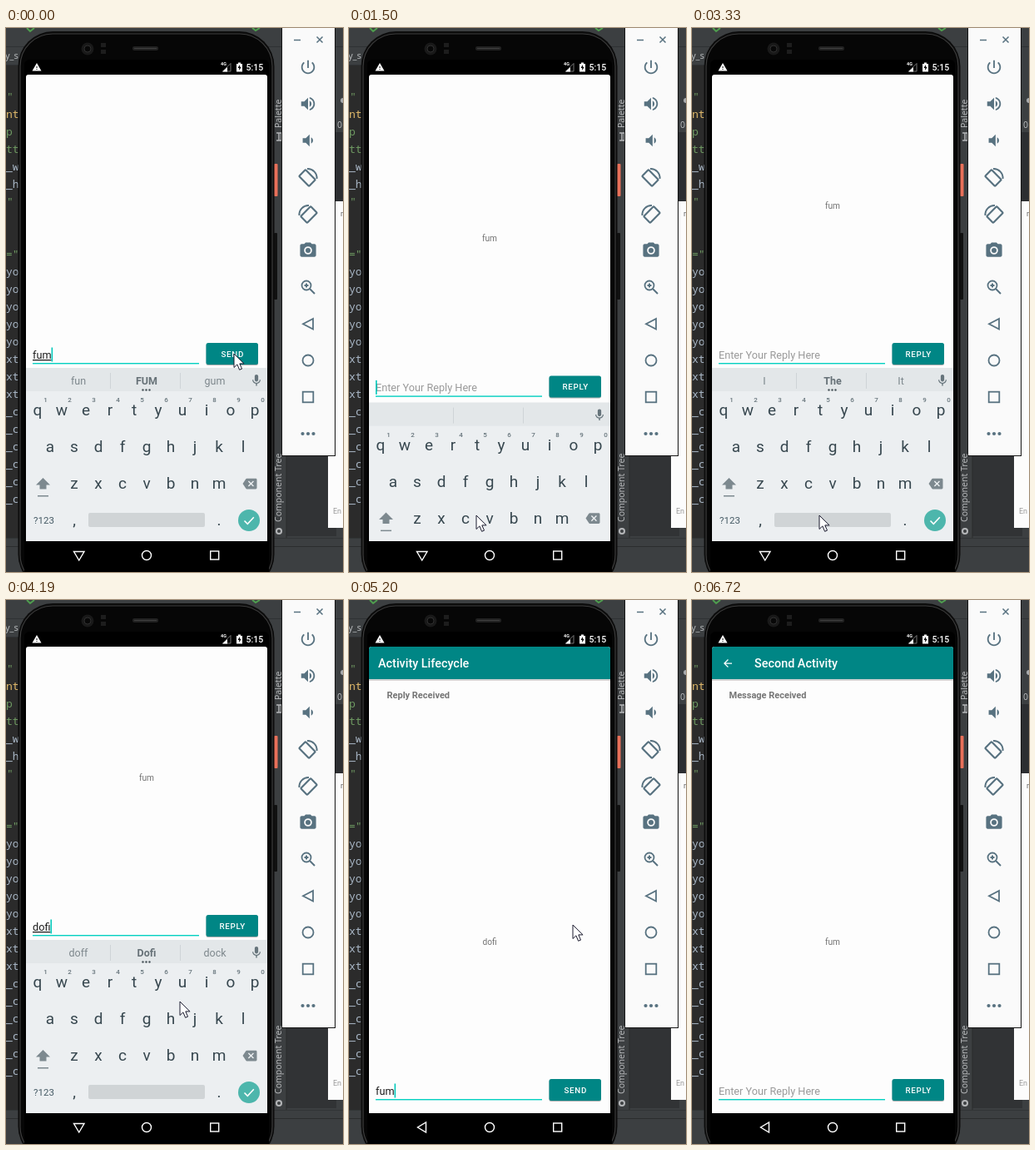
An HTML page that plays this animation: 405x653 px, repeating every 7.15 s.

```html
<!DOCTYPE html>
<html lang="en">
<head>
<meta charset="utf-8">
<title>Two activities exchanging messages</title>
<style>
html, body { margin: 0; height: 100%; overflow: hidden; background: #3c3f41; }
svg { display: block; width: 100vw; height: 100vh; font-family: Roboto, sans-serif; }
.mid { text-anchor: middle; }
.code { font: 13px "Noto Sans Mono", monospace; }
.tab { font: 11px "Noto Sans", sans-serif; fill: #b5b8ba; }
.title { font-size: 14.4px; font-weight: 500; fill: #fff; }
.label { font-size: 11px; font-weight: 700; fill: #757575; }
.msg { font-size: 10.2px; fill: #757575; text-anchor: middle; }
.input { font-size: 12.7px; }
.btn { font-size: 9.8px; font-weight: 500; letter-spacing: .7px; fill: #fff; text-anchor: middle; }
.key { font-size: 19px; fill: #37474f; text-anchor: middle; }
.num { font-size: 8px; font-weight: 500; fill: #66747b; text-anchor: middle; }
.word { font-size: 12.5px; fill: #7d878c; text-anchor: middle; }
.side { font: 10.5px "Noto Sans", sans-serif; fill: #b4b6b8; }
</style>
</head>
<body>
<svg id="stage" viewBox="0 0 405 653" preserveAspectRatio="none"></svg>
<script>
const LOOP = 7150, PAN = 197, TEAL = '#008685', PRESSED = '#38a2a1';
const SENT = 'fum', REPLY = 'dofi';

const rect = (x, y, w, h, fill, more = '') =>
  `<rect x="${x}" y="${y}" width="${w}" height="${h}" fill="${fill}" ${more}/>`;
const text = (x, y, s, cls, more = '') => `<text x="${x}" y="${y}" class="${cls}" ${more}>${s}</text>`;
const line = (d, stroke, width = 1.5, more = '') =>
  `<path d="${d}" fill="none" stroke="${stroke}" stroke-width="${width}" ${more}/>`;
const dot = (x, y, r, fill, more = '') => `<circle cx="${x}" cy="${y}" r="${r}" fill="${fill}" ${more}/>`;
// A 24-unit icon centred on x, y
const icon = (x, y, size, d, fill) =>
  `<path transform="translate(${x - size / 2} ${y - size / 2}) scale(${size / 24})" d="${d}" fill="${fill}" fill-rule="evenodd"/>`;

function backdrop() {
  const rows = '"|nt|p|tt|_w|_h|"|||="|yo|yo|yo|yo|yo|xt|xt|xt|_c|_c|_c|_c|_c|_c'.split('|');
  const tint = s => s.includes('"') || s === 'p' || s === 'tt' ? '#6f9a62' : s === 'nt' ? '#e0b96a' : '#a9b7c6';
  return rect(0, 0, 405, 653, '#3c3f41') + rect(0, 44, 30, 568, '#2b2b2b') +
    line('M0 22.5H405M0 44.5H30', '#2f3234', 1) + text(-1, 37, 'y_s', 'tab') +
    rows.map((s, i) => text(s === '"' ? 1 : 0, 87 + 21 * i, s, 'code', `fill="${tint(s)}"`)).join('') +
    line('M25 0l4 4 5-4M296 0l4 3 5-3', '#4f9e4f', 2) +
    rect(337, 513, 60, 97, '#313335') + line('M337 513V612', '#2a2c2d', 1) +
    text(0, 0, 'Palette', 'side', 'transform="translate(331 120) rotate(-90)"') +
    text(0, 0, 'Component Tree', 'side', 'transform="translate(331 593) rotate(-90)"') +
    line('M325 126h6v9h-6M328 126v9', '#b4b6b8', 1.5) + dot(328, 604, 3, 'none', 'stroke="#b4b6b8" stroke-width="2"') +
    rect(396, 125, 9, 83, '#2c2e31') + text(398, 120, '0', 'side') +
    dot(405, 87, 3, '#a9abad') + rect(387, 208, 18, 392, '#fcfcfc') +
    text(393, 583, 'En', '', 'font-size="9" fill="#999"') + text(402, 226, 'r', '', 'font-size="9" fill="#666"') +
    line('M0 622.5H405', '#2b2d2e', 1) + line('M0 612.5H405', '#323536', 1);
}

function phone() {
  return rect(322, 163, 4.5, 39, '#e8705a', 'rx="1"') + rect(322, 246, 4, 80, '#111', 'rx="1"') +
    rect(14.5, 4, 308, 670, '#0c0c0c', 'rx="42"') +
    rect(17, 7, 303, 664, '#060606', 'rx="39" stroke="#3c3c3c" stroke-width="1.2"') +
    rect(22, 38, 294, 620, '#000', 'rx="6"') +
    dot(98, 25, 7.5, '#191919') + dot(98, 25, 4, '#080808', 'stroke="#303030"') +
    rect(114, 18, 6, 5, '#1d1d1d') + rect(114, 26, 6, 5, '#1d1d1d') +
    rect(152, 22, 31, 5, '#222', 'rx="2"') + line('M154 24.5H181', '#404040', 1);
}

function statusBar() {
  return icon(37, 47, 12, 'M1 21h22L12 2zm12-3h-2v-2h2zm0-4h-2v-4h2z', '#fff') +
    text(258, 45, '4G', '', 'font-size="5.5" font-weight="700" fill="#fff"') +
    line('M270 42.5V52h-9.5z', '#777', 1) + `<path d="M266 47v5.5h-6z" fill="#fff"/>` +
    `<path d="M277 43h2v-1.500h3v1.500h2v9.500h-7z" fill="#fff"/><path d="M281 44l-2.500 4h1.700v3l2.500-4.200h-1.700z" fill="#000"/>` +
    text(288.5, 51, '5:15', '', 'font-size="10.5" font-weight="500" fill="#fff"');
}

function activity(id, title, titleX, label, labelX, message, button, arrow) {
  return `<g id="${id}">` + rect(24, 38, 290, 615, '#000') +
    `<g clip-path="url(#content)">` + rect(24, 56, 290, 560, '#fdfdfd') + `<g id="${id}Pan">` +
    rect(24, 95, 290, 2, '#000', 'opacity=".16"') + rect(24, 56, 290, 39, TEAL) +
    (arrow ? icon(43, 76, 15, 'M20 11H7.830l5.590-5.590L12 4l-8 8 8 8 1.410-1.410L7.830 13H20z', '#fff') : '') +
    text(titleX, 81, title, 'title') +
    `<g id="${id}Body">` + text(labelX, 118, label, 'label') + text(169, 414, message, 'msg') + '</g>' +
    rect(32, 599, 200, 1.4, '#03d0c1', `id="${id}Line"`) + text(32, 594, '', 'input', `id="${id}Text"`) +
    rect(0, 580.5, 1.6, 17, '#03c9bb', `id="${id}Caret"`) +
    rect(240.5, 575, 62.5, 26, TEAL, `rx="2.5" id="${id}Btn"`) + text(272.2, 592, button, 'btn') +
    '</g></g></g>';
}

function keyboard() {
  const row = (letters, x, y) => [...letters].map((c, i) => text(x + 29 * i, y, c, 'key')).join('');
  return `<g clip-path="url(#content)"><g id="kb">` + rect(24, 408, 290, 208, '#eceff1') + rect(24, 408, 290, 28, '#e3e7e9') +
    line('M125.500 414V433M209.500 414V433', '#cfd4d7', 1) +
    [87, 169, 251].map((x, i) => text(x, 428, '', 'word', `id="word${i}"` + (i === 1 ? ' style="font-weight:700;fill:#667177"' : ''))).join('') +
    `<g id="dots">` + [164.5, 168.5, 172.5].map(x => dot(x, 434.5, 1.2, '#4a555b')).join('') + '</g>' +
    icon(301, 423, 17, 'M12 14c1.660 0 3-1.340 3-3V5c0-1.660-1.340-3-3-3S9 3.340 9 5v6c0 1.660 1.340 3 3 3zm5.300-3c0 3-2.540 5.100-5.300 5.100S6.700 14 6.700 11H5c0 3.410 2.720 6.230 6 6.720V21h2v-3.280c3.280-.480 6-3.300 6-6.720z', '#66747b') +
    [...'1234567890'].map((c, i) => text(47.5 + 29 * i, 449, c, 'num')).join('') +
    row('qwertyuiop', 38, 465) + row('asdfghjkl', 53, 509) + row('zxcvbnm', 82, 553) +
    `<path d="M44.500 540l8.500 8.500h-4.500v5h-8v-5h-4.500z" fill="#7d898f"/>` + rect(38, 561, 13, 1.5, '#7d898f') +
    icon(293, 547, 17, 'M22 3H7c-.690 0-1.230.350-1.590.880L0 12l5.410 8.110c.360.530.900.890 1.590.890h15c1.100 0 2-.900 2-2V5c0-1.100-.900-2-2-2zm-3 12.590L17.590 17 14 13.410 10.410 17 9 15.590 12.590 12 9 8.410 10.410 7 14 10.590 17.590 7 19 8.410 15.410 12z', '#7d898f') +
    text(45.5, 595, '?123', 'mid', 'font-size="11.5" fill="#455a64"') + text(82, 597, ',', 'key') + text(256, 597, '.', 'key') +
    rect(99, 582, 140, 17, '#d0d4d6', 'rx="2"') + dot(292, 591, 13, '#4db6ac') +
    line('M286.500 591.500l3.800 3.800 7.500-8', '#fff', 1.6) + '</g></g>';
}

function toolPanel() {
  const c = '#587280', x = 363;
  const turn = (y, flip) => `<g transform="translate(${x} ${y}) scale(${flip} 1)">` +
    rect(-5.5, -8.5, 11, 17, 'none', `rx="1" transform="translate(-1 1) rotate(-45)" stroke="${c}" stroke-width="2.2"`) +
    line('M-1 -10A11 11 0 0 1 10.500 2', c, 2) + '</g>';
  return rect(331.5, -1, 64, 514.5, '#fafafa', 'stroke="#151515"') +
    line('M346 14.500h8M373.500 10.500l7 7M380.500 10.500l-7 7', c, 1.5) +
    icon(x, 47, 22, 'M13 3h-2v10h2zm4.830 2.170l-1.420 1.420C17.990 7.860 19 9.810 19 12c0 3.870-3.130 7-7 7s-7-3.130-7-7c0-2.190 1.010-4.140 2.580-5.420L6.170 5.170C4.230 6.820 3 9.260 3 12c0 4.970 4.030 9 9 9s9-4.030 9-9c0-2.740-1.230-5.180-3.170-6.830z', c) +
    icon(x, 91, 22, 'M3 9v6h4l5 5V4L7 9zm13.500 3c0-1.770-1.020-3.290-2.500-4.030v8.050c1.480-.730 2.500-2.250 2.500-4.020zM14 3.230v2.060c2.890.860 5 3.540 5 6.710s-2.110 5.850-5 6.710v2.060c4.010-.910 7-4.490 7-8.770s-2.990-7.860-7-8.770z', c) +
    icon(x, 135, 22, 'M18.500 12c0-1.770-1.020-3.290-2.500-4.030v8.050c1.480-.730 2.500-2.250 2.500-4.020zM5 9v6h4l5 5V4L9 9z', c) +
    turn(179, 1) + turn(223, -1) +
    icon(x, 267, 23, 'M9 2L7.170 4H4c-1.100 0-2 .900-2 2v12c0 1.100.900 2 2 2h16c1.100 0 2-.900 2-2V6c0-1.100-.900-2-2-2h-3.170L15 2zm3 15a5 5 0 1 1 0-10 5 5 0 0 1 0 10z', c) + dot(x, 267, 3, c) +
    dot(361, 309, 5.5, 'none', `stroke="${c}" stroke-width="1.8"`) + line('M365 313l6 6M358.500 309h5M361 306.500v5', c, 2) +
    line('M369 349v12.500l-12-6.250z', c, 1.8) + dot(x, 399, 6.5, 'none', `stroke="${c}" stroke-width="1.8"`) +
    rect(356.7, 436.7, 12.6, 12.6, 'none', `stroke="${c}" stroke-width="1.8"`) +
    [356.5, 363, 369.5].map(px => dot(px, 487, 2.1, c)).join('');
}

document.getElementById('stage').innerHTML =
  `<clipPath id="content"><path d="M24 616V59q0-3 3-3h284q3 0 3 3v557z"/></clipPath>` +
  `<clipPath id="screen"><rect x="24" y="56" width="290" height="597"/></clipPath>` +
  backdrop() + phone() + `<g clip-path="url(#screen)">` +
  activity('main', 'Activity Lifecycle', 35, 'Reply Received', 45.5, REPLY, 'SEND', false) +
  activity('second', 'Second Activity', 75, 'Message Received', 44.5, SENT, 'REPLY', true) +
  keyboard() + '</g>' + statusBar() +
  `<path id="back" fill="none" stroke="#fff" stroke-width="1.4"/>` + dot(169, 633, 5.5, 'none', 'stroke="#fff" stroke-width="1.4"') +
  rect(245.7, 628, 10, 10, 'none', 'stroke="#fff" stroke-width="1.4"') + toolPanel() +
  `<path id="pointer" d="M0 0v16.500l3.900-3.600 2.700 6.400 2.900-1.200-2.700-6.200h5.300z" fill="#fff" stroke="#1a1a2e"/>`;

const $ = id => document.getElementById(id);
const set = (id, attrs) => { for (const k in attrs) $(id).setAttribute(k, attrs[k]); };

// Each entry changes only the named parts of the state from its time on
const steps = [
  [0, { at: [274, 391], kb: 1, down: 1, mainPan: 1, secondPan: 0, alpha: 0, shift: 0, reply: 0, typed: '', mark: 1,
        caret: 1, words: ['fun', 'FUM', 'gum'], mainFill: TEAL, secondFill: TEAL, lift: 2 }],
  [120, { at: [273, 391], mainFill: PRESSED }],
  [270, { at: [240, 404], down: 0, alpha: .5, shift: 20, mark: 0 }],
  [390, { at: [185, 424], alpha: 1, shift: 3, kb: .4 }],
  [540, { at: [143, 434], shift: 0, kb: 0, mainPan: 0, mainFill: TEAL }],
  [690, { at: [147, 440] }],
  [810, { at: [151, 500] }],
  [930, { at: [152, 553], caret: 0 }],
  [1080, { at: [153, 584] }],
  [1230, { at: [153, 585], caret: 1 }],
  [1380, { kb: .35, secondPan: .35, down: 1, words: ['', '', ''] }],
  [1500, { kb: .8, secondPan: .8 }],
  [1620, { kb: 1, secondPan: 1 }],
  [1900, { caret: 0 }],
  [2030, { typed: 's', caret: 1 }],
  [2180, { mark: 1, words: ['is', 'a', 'as'] }],
  [2610, { caret: 0 }],
  [2750, { typed: '', caret: 1 }],
  [3030, { words: ['I', 'The', 'It'] }],
  [3330, { caret: 0 }],
  [3480, { typed: REPLY.slice(0, 2), caret: 1 }],
  [3610, { typed: REPLY.slice(0, 3) }],
  [3750, { typed: REPLY, words: ['doff', 'Dofi', 'dock'] }],
  [4190, { at: [209, 482] }],
  [4310, { at: [233, 443] }],
  [4430, { at: [257, 404], caret: 0 }],
  [4550, { at: [272, 388] }],
  [4830, { at: [269, 389], caret: 1, mark: 0, secondFill: PRESSED, down: 0, reply: 1 }],
  [5080, { alpha: .4, kb: .4 }],
  [5200, { at: [269, 390], alpha: 0, kb: 0, secondPan: 0, typed: '', secondFill: TEAL }],
  [5350, { at: [268, 393], caret: 0 }],
  [5500, { at: [279, 455] }],
  [5620, { at: [291, 545] }],
  [5740, { at: [296, 591], caret: 1 }],
  [6030, { at: [296, 592], mainFill: '#0b8c89', lift: 7 }],
  [6150, { alpha: .6, shift: 34 }],
  [6300, { alpha: 1, shift: 5 }],
  [6420, { shift: 0 }],
  [6570, { at: [330, 640] }],
  [6720, { at: [-50, 0], caret: 0 }]
];

function drawActivity(id, pan, typed, mark, fill, caret, lift) {
  const box = $(id + 'Text');
  set(id + 'Pan', { transform: `translate(0 ${-PAN * pan})` });
  box.textContent = typed || 'Enter Your Reply Here';
  box.setAttribute('fill', typed ? '#1c1c1c' : '#9a9a9a');
  box.style.textDecoration = typed && mark ? 'underline' : 'none';
  set(id + 'Caret', { x: 32 + (typed ? box.getComputedTextLength() : 0), opacity: caret });
  const button = $(id + 'Btn');
  button.setAttribute('fill', fill);
  button.style.filter = `drop-shadow(0 ${lift / 2}px ${lift / 3}px rgba(0,0,0,.3))`;
}

function draw(now) {
  const t = now % LOOP;
  const s = Object.assign({}, ...steps.filter(([at]) => at <= t).map(step => step[1]));
  drawActivity('main', s.mainPan, SENT, s.mark, s.mainFill, s.caret, s.lift);
  drawActivity('second', s.secondPan, s.typed, s.mark, s.secondFill, s.caret, 2);
  set('mainBody', { opacity: s.reply });
  set('second', { opacity: s.alpha, transform: `translate(0 ${s.shift})` });
  set('kb', { transform: `translate(0 ${208 * (1 - s.kb)})` });
  s.words.forEach((w, i) => { $('word' + i).textContent = w; });
  set('dots', { opacity: s.words[1] ? 1 : 0 });
  set('back', { d: s.down ? 'M81.500 628.500h12.500l-6.250 10.500z' : 'M92.500 627v12l-10-6z' });
  set('pointer', { transform: `translate(${s.at})` });
}

const start = performance.now();
(function tick() {
  draw(performance.now() - start);
  requestAnimationFrame(tick);
})();
</script>
</body>
</html>
```
